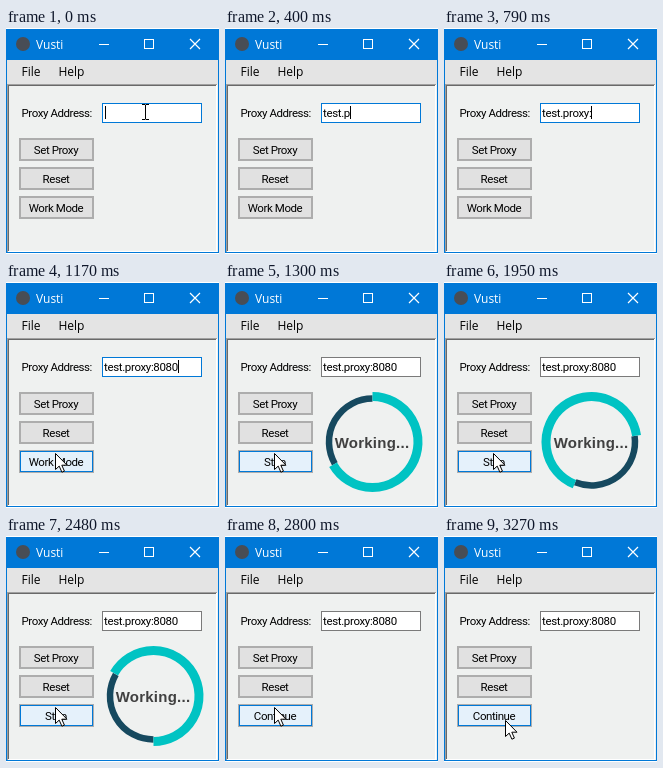
An HTML page that plays this animation: 213x226 px, repeating every 3.36 s.

```html
<!DOCTYPE html>
<html lang="en">
<head>
<meta charset="utf-8">
<title>Proxy tool</title>
<style>
  html, body { margin: 0; width: 100%; height: 100%; overflow: hidden; background: #f0f0f0; }
  svg { display: block; width: 213px; height: 226px; }
  text { white-space: pre; }
  .ui { font: 12px "Open Sans", "Noto Sans", sans-serif; }
  .form { font: 11.5px Roboto, Arial, sans-serif; letter-spacing: -.43px; fill: #000; }
  .mid { text-anchor: middle; }
  #entry { letter-spacing: -.35px; }
  #busy text { font: bold 15px "Liberation Sans", Arial, sans-serif; letter-spacing: .25px; fill: #404040; }
</style>
</head>
<body>
<svg viewBox="0 0 213 226">
  <rect width="213" height="226" fill="#fff"/>
  <rect y="1" width="213" height="224" fill="#0078d7"/>
  <rect x="1" y="32" width="211" height="192" fill="#eff1f0"/>

  <circle cx="17" cy="16" r="7" fill="#484d55"/>
  <text class="ui" x="30" y="21" fill="#fff">Vusti</text>
  <g fill="none" stroke="#fff" shape-rendering="crispEdges">
    <path d="M93 16.5h10"/>
    <rect x="138.5" y="11.5" width="9" height="9"/>
  </g>
  <path d="M184 11l10 10M194 11l-10 10" stroke="#fff" stroke-width="1.2" fill="none"/>

  <rect x="1" y="32" width="211" height="24" fill="#e4e4e4"/>
  <text class="ui" x="15.5" y="48">File</text>
  <text class="ui" x="52.5" y="48">Help</text>

  <g fill="none" shape-rendering="crispEdges">
    <path d="M1.5 224V56.5H211" stroke="#a0a0a0"/>
    <path d="M2.5 223V57.5H210" stroke="#696969"/>
    <path d="M2 223.5H210.5V57" stroke="#fff"/>
  </g>

  <text class="form" x="15.5" y="89">Proxy Address:</text>
  <rect id="field" x="96.5" y="75.5" width="99" height="19" fill="#fff" shape-rendering="crispEdges"/>
  <text id="entry" class="form" x="98" y="89"></text>
  <rect id="caret" y="78" width="1" height="13" shape-rendering="crispEdges"/>

  <g id="buttons"></g>

  <g id="busy">
    <g id="ring" fill="none">
      <path id="dark" stroke="#16495f" stroke-width="6.5"/>
      <path id="teal" stroke="#00c3c3" stroke-width="9"/>
    </g>
    <text class="mid" x="147" y="166">Working...</text>
  </g>

  <path id="beam" d="M136 76.5h3l.5 .5 .5-.5h3M139.5 77v14M136 91.5h3l.5-.5 .5 .5h3" fill="none" stroke="#000"/>
  <path id="arrow" d="M.5 .5V16.5L4.2 13.1L6.9 19.2L9.4 18.1L6.8 12.2H12Z" fill="#fff" stroke="#000"/>
</svg>
<script>
  const LOOP = 3360;
  const STEPS = [0, 80, 160, 240, 320, 400, 470, 550, 640, 710, 790, 870, 940, 1020, 1100,
    1170, 1250, 1300, 1390, 1470, 1550, 1630, 1700, 1780, 1870, 1950, 2010, 2090, 2160,
    2250, 2330, 2410, 2480, 2560, 2640, 2720, 2800, 2890, 3270];
  const SPIN = [[1300, 240], [1630, 380], [1950, 442], [2480, 540], [2800, 600]];
  const ADDRESS = "test.proxy:8080";
  const HOVER = 1170, BLUR = 1250, START = 1300, STOP = 2800, MOVE = 2890, NUDGE = 3270;
  const CX = 147.5, CY = 160;
  const $ = id => document.getElementById(id);
  const show = (el, on) => el.setAttribute("display", on ? "inline" : "none");

  function addButton(y, label) {
    const g = document.createElementNS("http://www.w3.org/2000/svg", "g");
    g.innerHTML = `<g shape-rendering="crispEdges">
      <rect x="13" y="${y}" width="75" height="23" fill="#adadad"/>
      <rect x="14.5" y="${y + 1.5}" width="72" height="20" fill="#e1e1e1" stroke="#adadad"/></g>
      <text class="form mid" x="50" y="${y + 16}">${label}</text>`;
    $("buttons").append(g);
    return { face: g.querySelectorAll("rect")[1], text: g.querySelector("text") };
  }

  // Arc around the ring centre, angles clockwise from the top
  function arc(r, from, to) {
    const point = deg => {
      const a = deg * Math.PI / 180;
      return `${CX + r * Math.sin(a)} ${CY - r * Math.cos(a)}`;
    };
    return `M${point(from)}A${r} ${r} 0 ${to - from > 180 ? 1 : 0} 1 ${point(to)}`;
  }

  function spinAngle(t) {
    let i = 0;
    while (i < SPIN.length - 2 && t >= SPIN[i + 1][0]) i++;
    const [t0, a0] = SPIN[i], [t1, a1] = SPIN[i + 1];
    return a0 + (a1 - a0) * (t - t0) / (t1 - t0);
  }

  addButton(110, "Set Proxy");
  addButton(139, "Reset");
  const mode = addButton(168, "Work Mode");
  $("dark").setAttribute("d", arc(43.5, 0, 120));
  $("teal").setAttribute("d", arc(45.5, 120, 360));

  function draw(t) {
    const step = STEPS.findLastIndex(s => s <= t);
    t = STEPS[step];

    // Two characters land together in the fourth step
    const typed = Math.min(step + (step >= 4 ? 1 : 0), ADDRESS.length);
    const entry = $("entry");
    entry.textContent = ADDRESS.slice(0, typed);
    const width = typed ? entry.getComputedTextLength() : 0;
    $("caret").setAttribute("x", 99 + Math.max(0, Math.round(width) - 1));
    show($("caret"), t < BLUR);
    $("field").setAttribute("stroke", t < BLUR ? "#0078d7" : "#7a7a7a");
    show($("beam"), t < STEPS[1]);

    const hover = t >= HOVER;
    mode.face.setAttribute("fill", hover ? "#e5f1fb" : "#e1e1e1");
    mode.face.setAttribute("stroke", hover ? "#0078d7" : "#adadad");
    mode.text.textContent = t < START ? "Work Mode" : t < STOP ? "Stop" : "Continue";

    const busy = t >= START && t < STOP;
    show($("busy"), busy);
    if (busy) $("ring").setAttribute("transform", `rotate(${spinAngle(t)} ${CX} ${CY})`);

    show($("arrow"), hover);
    const [x, y] = t < MOVE ? [49, 171] : [t < NUDGE ? 60 : 61, 184];
    $("arrow").setAttribute("transform", `translate(${x} ${y})`);
  }

  const begin = performance.now();
  function tick() {
    draw((performance.now() - begin) % LOOP);
    requestAnimationFrame(tick);
  }
  tick();
</script>
</body>
</html>
```
